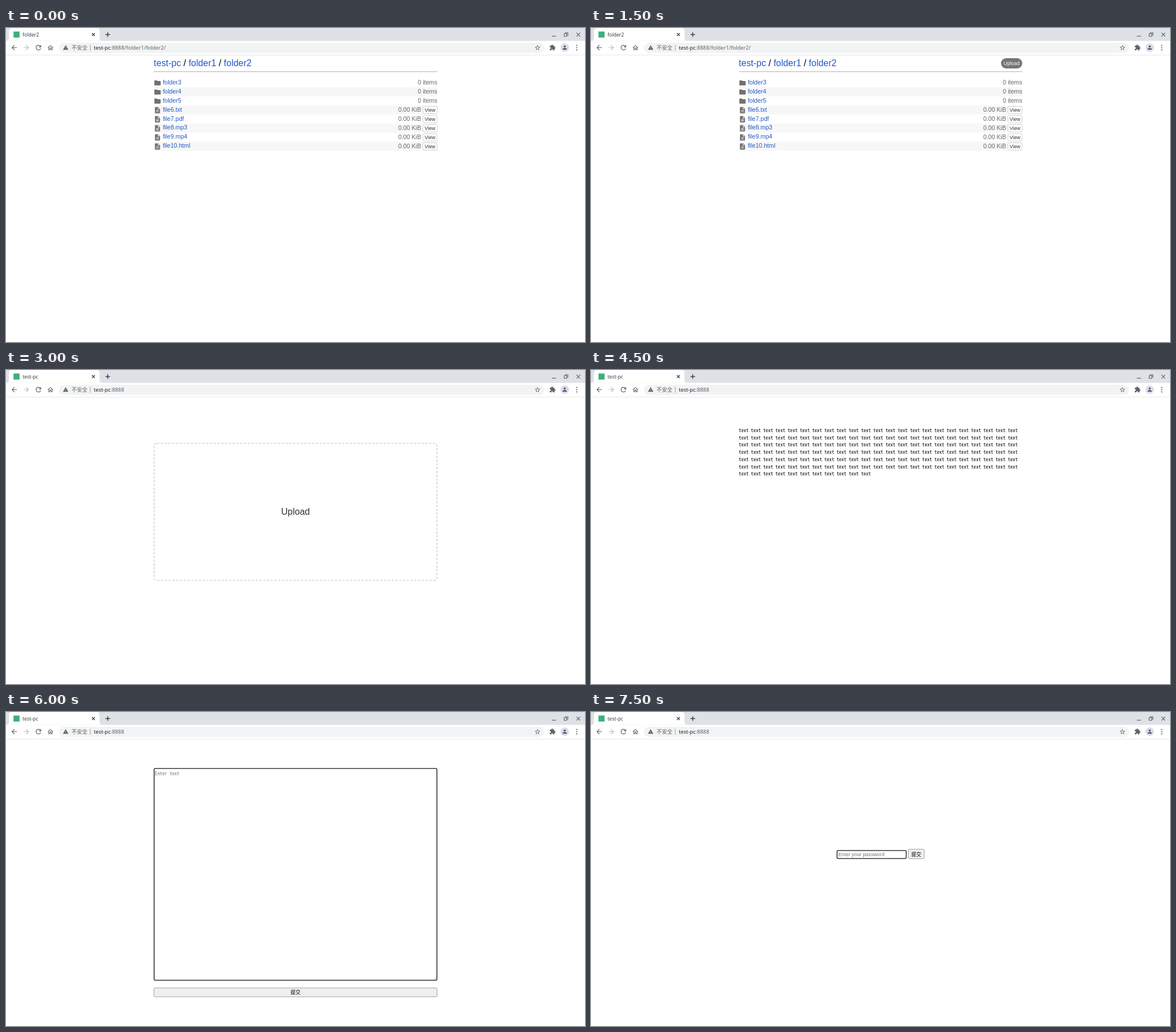
An HTML page with a canvas for the animation above (9 s loop, 1017 px wide and 551 px high).

```html
<!DOCTYPE html>
<html lang="en">
<head>
<meta charset="utf-8">
<title>File sharing pages</title>
<style>
  html, body { margin: 0; width: 100%; height: 100%; overflow: hidden; background: #fff; }
  canvas { display: block; width: 1017px; height: 551px; }
</style>
</head>
<body>
<canvas id="stage"></canvas>
<script>
const W = 1017, H = 551, SCENE_MS = 1500;
const canvas = document.getElementById('stage');
const ctx = canvas.getContext('2d');
const dpr = window.devicePixelRatio || 1;
canvas.width = W * dpr;
canvas.height = H * dpr;

// The browser window is shown at this scale.
const S = 1017 / 1532;
const LEFT = 259.6, RIGHT = 757.5;
const BLUE = '#2159c9', INK = '#5f6368', DARK = '#202124', GREY = '#757575';

const SANS = '"Liberation Sans", Arial, sans-serif';
const UI = '"Noto Sans", "Noto Sans CJK SC", sans-serif';
const CJK = '"Noto Sans CJK SC", "Noto Sans CJK JP", sans-serif';
const MONO = '"Noto Sans Mono CJK SC", "Noto Sans Mono CJK JP", monospace';

const ICONS = {
  back: 'M20 11H7.83l5.59-5.59L12 4l-8 8 8 8 1.41-1.41L7.83 13H20v-2z',
  forward: 'M12 4l-1.41 1.41L16.17 11H4v2h12.17l-5.58 5.59L12 20l8-8z',
  reload: 'M17.65 6.35C16.2 4.9 14.21 4 12 4c-4.42 0-8 3.58-8 8s3.58 8 8 8c3.73 0 6.84-2.55 7.73-6h-2.08c-.82 2.33-3.04 4-5.65 4-3.31 0-6-2.69-6-6s2.69-6 6-6c1.66 0 3.14.69 4.22 1.78L13 11h7V4z',
  home: 'M12 5.69l5 4.5V18h-2v-6H9v6H7v-7.81l5-4.5M12 3L2 12h3v8h6v-6h2v6h6v-8h3z',
  warning: 'M1 21h22L12 2 1 21zm12-3h-2v-2h2v2zm0-4h-2v-4h2v4z',
  star: 'M22 9.24l-7.19-.62L12 2 9.19 8.63 2 9.24l5.46 4.73L5.82 21 12 17.27 18.18 21l-1.63-7.03zM12 15.4l-3.76 2.27 1-4.28-3.32-2.88 4.38-.38L12 6.1l1.71 4.04 4.38.38-3.32 2.88 1 4.28z',
  puzzle: 'M20.5 11H19V7c0-1.1-.9-2-2-2h-4V3.5a2.5 2.5 0 0 0-5 0V5H4c-1.1 0-2 .9-2 2v3.8h1.5a2.7 2.7 0 0 1 0 5.4H2V20c0 1.1.9 2 2 2h3.8v-1.5a2.7 2.7 0 0 1 5.4 0V22H17c1.1 0 2-.9 2-2v-4h1.5a2.5 2.5 0 0 0 0-5z',
  person: 'M12 12a4 4 0 1 0 0-8 4 4 0 0 0 0 8zm0 2c-2.67 0-8 1.34-8 4v2h16v-2c0-2.66-5.33-4-8-4z',
  folder: 'M10 4H4c-1.1 0-2 .9-2 2v12c0 1.1.9 2 2 2h16c1.1 0 2-.9 2-2V8c0-1.1-.9-2-2-2h-8z',
  file: 'M14 2H6c-1.1 0-2 .9-2 2v16c0 1.1.9 2 2 2h12c1.1 0 2-.9 2-2V8zm2 16H8v-2h8v2zm0-4H8v-2h8v2zm-3-5V3.5L18.5 9z'
};
for (const name in ICONS) ICONS[name] = new Path2D(ICONS[name]);

function icon(name, cx, cy, size, color) {
  ctx.save();
  ctx.translate(cx - size / 2, cy - size / 2);
  ctx.scale(size / 24, size / 24);
  ctx.fillStyle = color;
  ctx.fill(ICONS[name]);
  ctx.restore();
}

// Draws text and returns the x where it ends.
function text(str, x, y, size, family, color, align = 'left') {
  ctx.font = `${size}px ${family}`;
  ctx.fillStyle = color;
  ctx.textAlign = align;
  ctx.fillText(str, x, y);
  return x + ctx.measureText(str).width;
}

function rect(x, y, w, h, color) {
  ctx.fillStyle = color;
  ctx.fillRect(x, y, w, h);
}

function box(x, y, w, h, r, fill, stroke, width = S) {
  ctx.beginPath();
  ctx.roundRect(x, y, w, h, r);
  if (fill) { ctx.fillStyle = fill; ctx.fill(); }
  if (stroke) { ctx.strokeStyle = stroke; ctx.lineWidth = width; ctx.stroke(); }
}

function circle(x, y, r, color) {
  ctx.beginPath();
  ctx.arc(x, y, r, 0, Math.PI * 2);
  ctx.fillStyle = color;
  ctx.fill();
}

function lines(color, width, ...segments) {
  ctx.strokeStyle = color;
  ctx.lineWidth = width;
  ctx.beginPath();
  for (const [x1, y1, x2, y2] of segments) {
    ctx.moveTo(x1, y1);
    ctx.lineTo(x2, y2);
  }
  ctx.stroke();
}

function cross(x, y, r, width, color) {
  lines(color, width, [x - r, y - r, x + r, y + r], [x - r, y + r, x + r, y - r]);
}

function tabStrip(title) {
  rect(0, 0, W, 22.6, '#dee1e6');
  ctx.fillStyle = '#fff';
  ctx.beginPath();
  ctx.moveTo(0, 22.6);
  ctx.quadraticCurveTo(5.3, 22.6, 5.3, 17.3);
  ctx.lineTo(5.3, 5.3);
  ctx.quadraticCurveTo(5.3, 0, 10.6, 0);
  ctx.lineTo(159, 0);
  ctx.quadraticCurveTo(164.3, 0, 164.3, 5.3);
  ctx.lineTo(164.3, 17.3);
  ctx.quadraticCurveTo(164.3, 22.6, 169.6, 22.6);
  ctx.fill();

  rect(13.2, 6.2, 10.6, 10.6, '#3eaf7c');
  text(title, 29, 14.9, 13 * S, UI, '#3c4043');
  cross(153.5, 11.5, 2.5, 1.3, '#3c4043');
  lines('#3c4043', 1.5, [174.7, 11.5, 182.7, 11.5], [178.7, 7.5, 178.7, 15.5]);

  lines(INK, 1.2, [958.8, 14.4, 966, 14.4]);
  ctx.strokeStyle = INK;
  ctx.lineWidth = 1.1;
  ctx.strokeRect(980.4, 10, 4.6, 4.6);
  ctx.beginPath();
  ctx.moveTo(982.4, 9.8);
  ctx.lineTo(982.4, 8.2);
  ctx.lineTo(987, 8.2);
  ctx.lineTo(987, 12.8);
  ctx.lineTo(985.2, 12.8);
  ctx.stroke();
  cross(1005.3, 11.6, 3.2, 1.2, INK);
}

function toolbar(path) {
  rect(0, 47.2, W, S, '#dadce0');
  icon('back', 14.4, 34.5, 14, INK);
  icon('forward', 35.7, 34.5, 14, '#babcbe');
  icon('reload', 57, 34.5, 14, INK);
  icon('home', 78.1, 34.6, 12.6, INK);

  box(93, 25.9, 852.3, 17.9, 8.95, '#f1f3f4');
  icon('warning', 104.8, 34.4, 10.4, INK);
  text('不安全', 115.2, 38.1, 14 * S, CJK, INK);
  rect(147.6, 29.5, 0.8, 10.4, '#85888c');
  const end = text('test-pc', 154.2, 38, 14 * S, UI, DARK);
  text(path, end, 38, 14 * S, UI, INK);

  icon('star', 933.6, 34.6, 11.4, INK);
  icon('puzzle', 960, 34.4, 11.6, INK);
  circle(981.4, 34.5, 7.4, '#dadde6');
  icon('person', 981.4, 34.3, 11, '#4a5170');
  for (const y of [30.6, 34.5, 38.4]) circle(1002.5, y, 1.1, INK);
}

const ENTRIES = ['folder3', 'folder4', 'folder5',
  'file6.txt', 'file7.pdf', 'file8.mp3', 'file9.mp4', 'file10.html'];

function listing(withUpload) {
  let x = LEFT;
  ['test-pc', 'folder1', 'folder2'].forEach((part, i) => {
    if (i) x = text(' / ', x, 67, 24 * S, SANS, '#000');
    x = text(part, x, 67, 24 * S, SANS, BLUE);
  });
  rect(LEFT, 76.1, RIGHT - LEFT, S, '#8c8c8c');
  rect(LEFT, 76.1 + S, RIGHT - LEFT, S, '#ddd');

  if (withUpload) {
    box(720.1, 53, RIGHT - 720.1, 18, 9, GREY);
    text('Upload', 738.8, 65, 40 / 3 * S, SANS, '#fff', 'center');
  }

  ENTRIES.forEach((name, i) => {
    const dy = 24 * S * i;
    const isFolder = name.startsWith('folder');
    if (i % 2) rect(LEFT, 88 + dy, RIGHT - LEFT, 24 * S, '#f7f7f7');
    icon(isFolder ? 'folder' : 'file', 266.1, 96.4 + dy, 20 * S, '#707070');
    text(name, 275.4, 98.8 + dy, 16 * S, SANS, BLUE);
    if (isFolder) {
      text('0 items', RIGHT, 98.9 + dy, 16 * S, SANS, '#666', 'right');
    } else {
      text('0.00 KiB', 729, 99.2 + dy, 16 * S, SANS, '#666', 'right');
      box(732.3, 89.9 + dy, 24.9, 12.6, 2, '#fff', '#bbb');
      text('View', 744.7, 99.3 + dy, 40 / 3 * S, SANS, '#333', 'center');
    }
  });
}

function dropZone() {
  ctx.setLineDash([6 * S, 4 * S]);
  box(260.2, 128.6, 496.7, 240.6, 5, null, '#c8c8c8', 2 * S);
  ctx.setLineDash([]);
  text('Upload', 508.5, 254, 24 * S, SANS, '#333', 'center');
}

function sharedText() {
  for (let row = 0; row < 7; row++) {
    const line = Array(row < 6 ? 23 : 11).fill('text').join(' ');
    text(line, LEFT, 108.9 + row * 12.75, 8.6, MONO, '#000');
  }
}

function submitButton(x, y, w, h, baseline) {
  box(x, y, w, h, 2, '#efefef', '#767676');
  text('提交', x + w / 2, baseline, 40 / 3 * S, CJK, '#000', 'center');
}

function textForm() {
  box(260.2, 99.1, 496.7, 371.6, 1.6, '#fff', '#101010', 2 * S);
  text('Enter text', 261.6, 111, 8.6, MONO, GREY);
  lines('#888', 0.6, [751.5, 469.3, 755.8, 465], [754, 469.3, 755.8, 467.5]);
  submitButton(259.9, 484.2, 497.3, 15.6, 495.4);
}

function passwordForm() {
  box(432.2, 243.1, 121.4, 14, 1.6, '#fff', '#101010', 2 * S);
  text('Enter your password', 434.2, 253, 40 / 3 * S, SANS, GREY);
  submitButton(557.4, 240.8, 27.8, 16.6, 252.8);
}

const FOLDER_PATH = ':8888/folder1/folder2/', ROOT_PATH = ':8888';
const SCENES = [
  ['folder2', FOLDER_PATH, () => listing(false)],
  ['folder2', FOLDER_PATH, () => listing(true)],
  ['test-pc', ROOT_PATH, dropZone],
  ['test-pc', ROOT_PATH, sharedText],
  ['test-pc', ROOT_PATH, textForm],
  ['test-pc', ROOT_PATH, passwordForm]
];

let start;
function render(now) {
  start ??= now;
  const index = Math.floor((now - start) / SCENE_MS) % SCENES.length;
  const [title, path, drawPage] = SCENES[index];
  ctx.setTransform(dpr, 0, 0, dpr, 0, 0);
  rect(0, 0, W, H, '#fff');
  tabStrip(title);
  toolbar(path);
  drawPage();
  requestAnimationFrame(render);
}
requestAnimationFrame(render);
</script>
</body>
</html>
```
